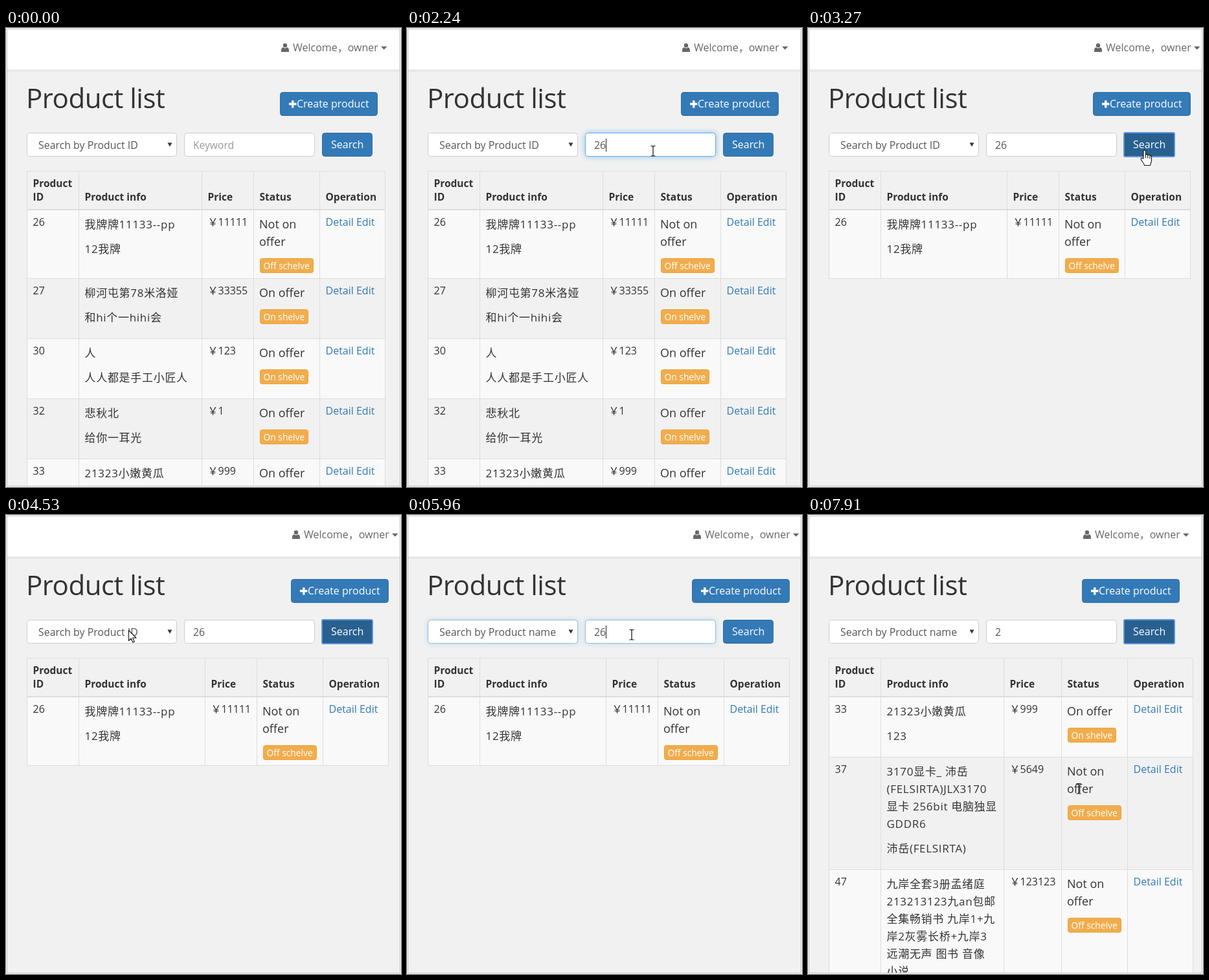
These frames come from a looping animation (610 by 710 pixels, 7.99 s). An HTML page:

```html
<!DOCTYPE html>
<html lang="en">
<head>
<meta charset="utf-8">
<title>Product list</title>
<style>
  html, body { margin: 0; width: 100%; height: 100%; overflow: hidden; background: #fff; }
  svg { display: block; }
  text { font: 16px 'Open Sans', 'Noto Sans CJK SC', 'Noto Sans CJK', sans-serif; fill: #333; }
  .title { font-size: 42px; letter-spacing: -.5px; }
  .user { fill: #666; }
  .white { fill: #fff; }
  .field { font-size: 15.9px; fill: #555; }
  .hint { font-size: 15.6px; fill: #999; }
  .option { font-size: 15.5px; fill: #555; }
  .head { font-size: 15.5px; font-weight: 700; }
  .info { font-size: 17px; letter-spacing: .7px; }
  .status { font-size: 18px; }
  .badge { font-size: 13.8px; fill: #fff; }
  .link { fill: #337ab7; }
  .glow { fill: #fff; stroke: #66afe9; filter: drop-shadow(0 0 4px rgba(102, 175, 233, .75)); }
</style>
</head>
<body>
<script>
const LOOP = 7990;
const NS = 'http://www.w3.org/2000/svg';

function add(parent, tag, attrs = {}, content) {
  const el = parent.appendChild(document.createElementNS(NS, tag));
  for (const key in attrs) el.setAttribute(key, attrs[key]);
  if (content !== undefined) el.textContent = content;
  return el;
}
const text = (parent, x, y, cls, content) => add(parent, 'text', { x, y, class: cls }, content);
const rect = (parent, x, y, width, height, attrs) => add(parent, 'rect', { x, y, width, height, ...attrs });
const path = (parent, d, attrs) => add(parent, 'path', { d, ...attrs });
const group = parent => add(parent, 'g');
const show = (el, on) => { el.style.display = on ? '' : 'none'; };

// Page
const stage = add(document.body, 'svg', { width: 610, height: 710 });
const page = add(stage, 'svg', { width: 608, height: 708 });
rect(page, 1, 1, 607, 707, { fill: '#f1f1f1' });
rect(page, 1, 64, 607, 4, { fill: '#e9e9e9' });
rect(page, 1, 64, 607, 2, { fill: '#e2e2e2' });
const nav = rect(page, 1, 1, 606, 63.5, { fill: '#fff' });
text(page, 31, 124, 'title', 'Product list');

// Items that move with the page width
const side = group(page);
path(side, 'M425 37v-2.5c0-3 1.5-4.5 3-4.5a4.5 4.5 0 0 0 6 0c1.5 0 3 1.5 3 4.5V37z', { fill: '#6b6666' });
add(side, 'circle', { cx: 431, cy: 27, r: 3.2, fill: '#6b6666' });
text(side, 443, 36, 'user', 'Welcome，owner');
path(side, 'M579 28.5h9.5l-4.75 5z', { fill: '#666' });
rect(side, 423.5, 99.5, 150, 36, { rx: 4, fill: '#337ab7', stroke: '#2e6da4' });
path(side, 'M437 117.5h11.5M442.75 112v11.5', { stroke: '#fff', 'stroke-width': 3.4 });
text(side, 449, 123, 'white', 'Create product');

// Search form
function field(x, width) {
  rect(page, x, 162.5, width, 36, { rx: 4, fill: '#fff', stroke: '#ccc' });
  return rect(page, x, 162.5, width, 36, { rx: 4, class: 'glow' });
}
const selectGlow = field(32.5, 231);
const inputGlow = field(275.5, 201);
const choice = text(page, 50, 187, 'field');
path(page, 'M249.5 177.5h7l-3.5 6z', { fill: '#333' });
const value = text(page, 289, 187, 'field');
const caret = rect(page, 0, 171, 1, 20, { fill: '#222' });
const button = rect(page, 488.5, 162.5, 77, 36, { rx: 4 });
const ring = rect(page, 488, 162, 78, 37, { rx: 2, fill: 'none', stroke: '#5e93dd', 'stroke-width': 2 });
text(page, 502, 186, 'white', 'Search');

// Tables: "^" starts a paragraph, "|" breaks a line
const gourd = [33, 999, true, 93, '21323小嫩黄瓜^123'];
const first = [26, 11111, false, 106, '我牌牌11133--pp^12我牌'];
const tables = [
  makeTable([32, 112, 302, 382, 484, 585], [
    first,
    [27, 33355, true, 93, '柳河屯第78米洛娅^和hi个一hihi会'],
    [30, 123, true, 93, '人^人人都是手工小匠人'],
    [32, 1, true, 93, '悲秋北^给你一耳光'],
    gourd
  ]),
  makeTable([32, 112, 307, 387, 489, 590], [first]),
  makeTable([32, 112, 302, 391, 493, 594], [
    gourd,
    [37, 5649, false, 174, '3170显卡_ 沛岳|(FELSIRTA)JLX3170|显卡 256bit 电脑独显|GDDR6^沛岳(FELSIRTA)'],
    [47, 123123, false, 212, '九岸全套3册孟绪庭|213213123九an包邮|全集畅销书 九岸1+九|岸2灰雾长桥+九岸3|远潮无声 图书 音像|小说']
  ])
];

function paragraphs(parent, x, y, cls, content) {
  for (const part of content.split('^')) {
    for (const line of part.split('|')) {
      text(parent, x, y, cls, line);
      y += 27;
    }
    y += 11;
  }
}

function makeTable(cols, rows) {
  const g = group(page), left = cols[0], right = cols[5];
  const at = i => cols[i] + 9.5;
  const line = d => path(g, d, { stroke: '#ddd', fill: 'none' });
  text(g, at(0), 246, 'head', 'Product');
  ['ID', 'Product info', 'Price', 'Status', 'Operation'].forEach((name, i) => text(g, at(i), 267, 'head', name));
  let y = 281;
  rows.forEach(([id, price, on, height, info], i) => {
    if (i % 2 === 0) rect(g, left, y + 1, right - left, height - 1, { fill: '#f9f9f9' });
    text(g, at(0), y + 25, '', id);
    paragraphs(g, at(1), y + 29, 'info', info);
    text(g, at(2), y + 25, '', '\uffe5' + price);
    paragraphs(g, at(3) - .5, y + 29, 'status', on ? 'On offer' : 'Not on|offer');
    const top = y + (on ? 48 : 75);
    rect(g, cols[3] + 10.5, top + .5, on ? 74 : 82, 22, { rx: 3, fill: '#f0ad4e', stroke: '#eea236' });
    text(g, cols[3] + 15.5, top + 17, 'badge', on ? 'On shelve' : 'Off schelve');
    text(g, at(4), y + 25, 'link', 'Detail Edit');
    y += height;
    line(`M${left} ${y + .5}H${right + 1}`);
  });
  line(`M${left} 221.5H${right + 1}`);
  rect(g, left, 280, right - left + 1, 2, { fill: '#ddd' });
  cols.forEach(x => line(`M${x + .5} 221V${y + 1}`));
  return g;
}

// Open select list
const list = group(page);
rect(list, 32.5, 199.5, 231, 43, { fill: '#fff', stroke: '#5b9bd8' });
const mark = rect(list, 33, 200, 230, 21.5, { fill: '#1e90ff' });
const options = ['ID', 'name'].map((key, i) => text(list, 50, 216 + 21 * i, 'option', 'Search by Product ' + key));

rect(stage, 1.5, 1.5, 607, 707, { fill: 'none', stroke: '#c4c4c4' });

// Pointers, each with its hot spot at 0,0
const outline = { fill: '#fff', stroke: '#111', 'stroke-width': 1.1, 'stroke-linejoin': 'round' };
const pointer = group(stage);
const shapes = {
  arrow: path(pointer, 'M.5 .5V16.5L4.2 13l2.6 6 2.5-1.1-2.6-5.9H12z', outline),
  beam: path(pointer, 'M-3.5-7.5h2.5l1 1 1-1h2.5M0-6.5V7M-3.5 8h2.5l1-1 1 1h2.5', { fill: 'none', stroke: '#111', 'stroke-width': 1.2 }),
  hand: path(pointer, 'M-2 13V1.7a1.7 1.7 0 0 1 3.4 0V8a1.65 1.65 0 0 1 3.3.5a1.6 1.6 0 0 1 3.2.8a1.4 1.4 0 0 1 2.6 1V16c0 3-1.8 4-1.8 7.5H-.5c0-2.5-3-5-5-8.5c-1.2-2 .8-3.5 2-2.5zM1.4 8v4M4.7 9v3.5M7.9 10v3', outline)
};

// Pointer moves: start, end, steps, then start, bend and end of the curve
const moves = [
  [150, 690, 8, [420, 500], [244, 65], [380, 190]],
  [2320, 2720, 6, [380, 190], [455, 244], [520, 189]],
  [3970, 4210, 4, [520, 189], [350, 225], [200, 188]],
  [4370, 4530, 3, [200, 188], [194, 183], [189, 178]],
  [4850, 5090, 4, [189, 178], [185, 205], [170, 233]],
  [5400, 5720, 5, [170, 233], [230, 210], [347, 185]],
  [6728, 7040, 5, [347, 185], [450, 183], [544, 176]],
  [7510, 7910, 6, [544, 176], [520, 260], [418, 423]]
];

const changes = [
  [0, { table: 0, key: 'ID', value: '', select: 0, input: 0, caret: false, ring: false, open: false }],
  [1000, { input: .5, caret: true }],
  [1080, { input: 1 }],
  [1540, { caret: false }],
  [1850, { value: '2', caret: true }],
  [2240, { value: '26' }],
  [2800, { input: .5, caret: false, ring: true }],
  [2880, { input: 0 }],
  [3270, { table: 1 }],
  [4610, { ring: false, select: .5 }],
  [4690, { select: 1, open: true }],
  [5320, { open: false, key: 'name' }],
  [5960, { select: .5, input: .5, caret: true }],
  [6030, { select: 0, input: 1 }],
  [6500, { caret: false }],
  [6650, { value: '2', caret: true }],
  [7430, { input: .5, caret: false, ring: true }],
  [7510, { input: 0 }],
  [7590, { table: 2 }]
];

function pointerAt(t) {
  const move = moves.filter(m => m[0] <= t).pop();
  if (!move) return null;
  const [start, end, steps, a, b, c] = move;
  const step = Math.floor((t - start) / ((end - start) / (steps - 1)) + 1e-6) + 1;
  const p = Math.min(1, step / steps), q = 1 - p;
  return a.map((v, i) => q * q * v + 2 * q * p * b[i] + p * p * c[i]);
}

function render(t) {
  const s = Object.assign({}, ...changes.filter(c => c[0] <= t).map(c => c[1]));
  const pos = pointerAt(t);
  const [x, y] = pos || [0, 0];
  const inRow = y >= 162 && y < 200;
  const hover = inRow && x >= 488 && x < 567;
  const kind = hover ? 'hand' : (inRow && x >= 275 && x < 477) || y > 281 ? 'beam' : 'arrow';

  tables.forEach((g, i) => show(g, i === s.table));
  const narrow = s.table === 1;
  side.setAttribute('transform', `translate(${narrow ? 17 : 0})`);
  nav.setAttribute('width', narrow ? 607 : 606);

  selectGlow.style.opacity = s.select;
  inputGlow.style.opacity = s.input;
  choice.textContent = 'Search by Product ' + s.key;
  value.textContent = s.value || 'Keyword';
  value.setAttribute('class', s.value ? 'field' : 'hint');
  caret.setAttribute('x', 289 + 9 * s.value.length);
  show(caret, s.caret);

  const dark = hover || s.ring;
  button.setAttribute('fill', dark ? '#286090' : '#337ab7');
  button.setAttribute('stroke', dark ? '#204d74' : '#2e6da4');
  show(ring, s.ring);

  const picked = y >= 221 ? 1 : 0;
  show(list, s.open);
  mark.setAttribute('y', 200 + 21.5 * picked);
  options.forEach((el, i) => { el.style.fill = i === picked ? '#fff' : ''; });

  show(pointer, pos);
  pointer.setAttribute('transform', `translate(${Math.round(x)} ${Math.round(y)})`);
  for (const name in shapes) show(shapes[name], name === kind);
}

const origin = performance.now();
function tick() {
  render((performance.now() - origin) % LOOP);
  requestAnimationFrame(tick);
}
tick();
</script>
</body>
</html>
```
